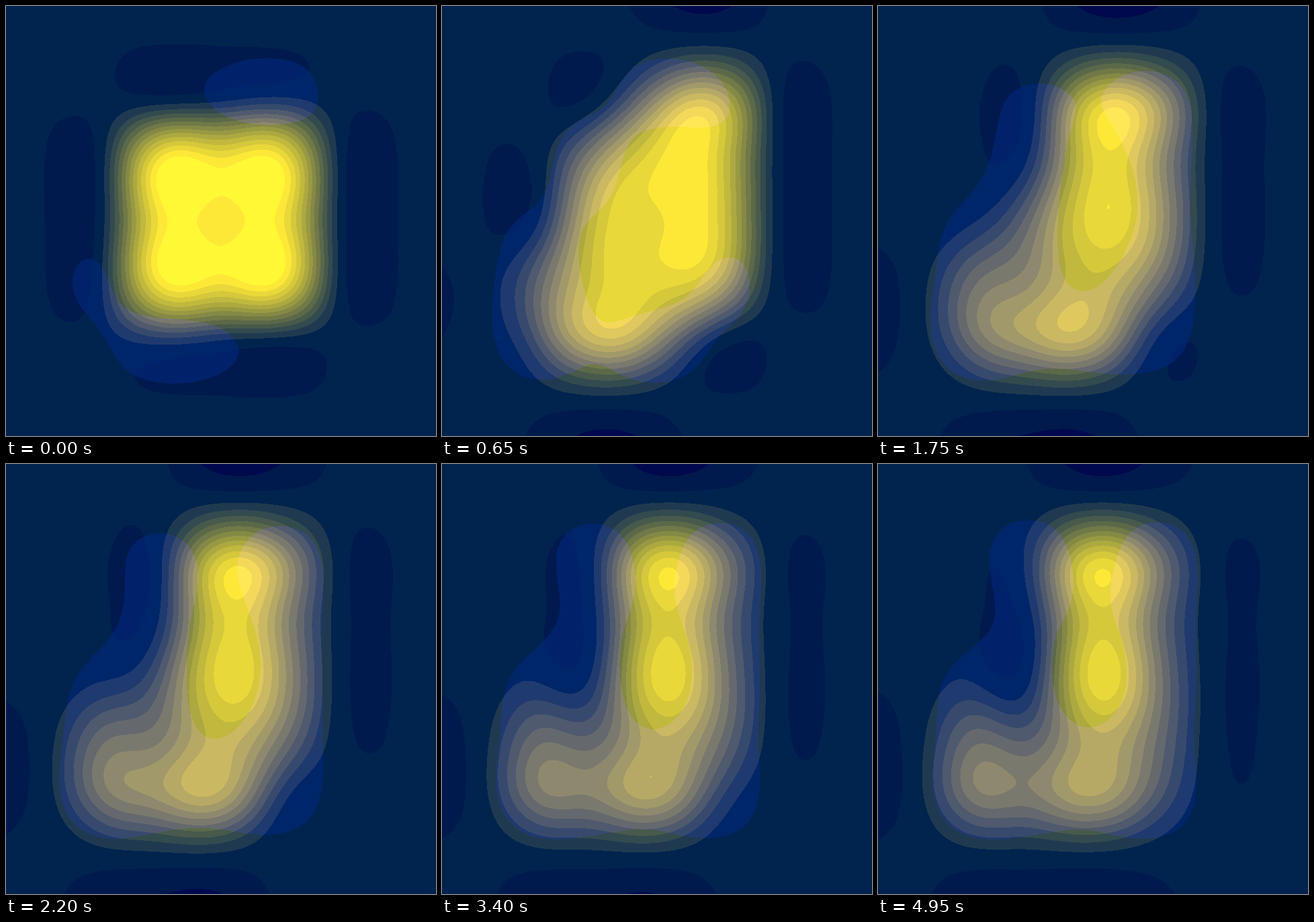
An HTML page with a canvas for the animation above (5000 ms loop, 640 by 640 pixels).

```html
<!DOCTYPE html>
<html lang="en">
<head>
<meta charset="utf-8">
<title>Heat map</title>
<style>
  html, body { margin: 0; width: 100%; height: 100%; overflow: hidden; background: #00244d; }
  canvas { display: block; width: 640px; height: 640px; }
</style>
</head>
<body>
<canvas id="stage" width="640" height="640"></canvas>
<script>
const SIZE = 640, CELLS = 7, LOOP = 5000, STEP = 50;

// Heat that the active cells (rows 1-5, columns 1-4) settle to.
const settled = [
  [0, .15, .86, .46],
  [0, .07, .85, .44],
  [.07, .08, .94, .5],
  [.37, .33, .7, .42],
  [.4, .44, .61, .28]
];

const clamp = (v, lo, hi) => Math.min(hi, Math.max(lo, v));

const sinc = x => x ? Math.sin(Math.PI * x) / (Math.PI * x) : 1;
const lanczos = x => Math.abs(x) < 3 ? sinc(x) * sinc(x / 3) : 0;

// Normalised filter weights for every pixel along one axis.
const weights = Array.from({ length: SIZE }, (_, p) => {
  const pos = (p + .5) * CELLS / SIZE - .5;
  const w = Array.from({ length: CELLS }, (_, c) => lanczos(pos - c));
  const sum = w.reduce((a, b) => a + b);
  return w.map(v => v / sum);
});

// A hot 3x3 block cools while heat spreads out of it towards two corners.
function heatAt(t, row, col) {
  if (row < 1 || row > 5 || col < 1 || col > 4) return 0;
  const end = settled[row - 1][col - 1];
  const offset = Math.abs(row - col);
  const inBlock = row > 1 && row < 5 && col > 1;
  if (!inBlock && offset < 2) return end * (t / LOOP) ** 1.3;

  const peak = col > 1 ? 1 : end;
  const cooling = offset ? 1700 : 850;
  const level = end + (peak - end) * Math.exp(-((t / cooling) ** 1.5));
  if (inBlock) return level;
  const filling = 380 * 2.3 ** Math.abs(3 - offset);
  return level * (1 - Math.exp(-(t + 35) / filling));
}

const greenOf = v => 34 + 198 * v;
const blueOf = v => 78 + 40 * (1 - Math.exp(-18 * v)) - 62 * v ** 3.5;

// Flat colour bands, each with a plain and a bluer shade.
const pack = (r, g, b) => (255 << 24 | Math.round(b) << 16 | Math.round(g) << 8 | Math.round(r)) >>> 0;
const bands = [[9, 22], [26, 34], [36, 38]].map(([g, blueG]) => [pack(0, g, 78), pack(0, blueG, 106)]);
for (let k = 0; k < 13; k++) {
  const g = 58 + 15.8 * k, r = (g - 34) * 1.28;
  bands.push([
    pack(Math.min(255, r), g, 80 - 2.3 * k),
    pack(Math.min(255, r + Math.min(10, 4 * k)), g, 110 - 4 * Math.max(0, k - 5))
  ]);
}
const bandOf = g => g < 8 ? 0 : g < 29 ? 1 : g < 50 ? 2 : 3 + Math.min(12, Math.floor((g - 50) / 16.25));
const bandTable = Array.from({ length: 256 }, (_, g) => bands[bandOf(g)]);

const ctx = document.getElementById("stage").getContext("2d");
const image = ctx.createImageData(SIZE, SIZE);
const pixels = new Uint32Array(image.data.buffer);
const makeLines = () => Array.from({ length: CELLS }, () => new Float32Array(SIZE));
const green = makeLines(), blue = makeLines();

function draw(t) {
  for (let row = 0; row < CELLS; row++) {
    const cells = Array.from({ length: CELLS }, (_, col) => heatAt(t, row, col));
    const greens = cells.map(greenOf), blues = cells.map(blueOf);
    for (let x = 0; x < SIZE; x++) {
      let g = 0, b = 0;
      for (let c = 0; c < CELLS; c++) {
        g += weights[x][c] * greens[c];
        b += weights[x][c] * blues[c];
      }
      green[row][x] = clamp(g, 0, 255);
      blue[row][x] = clamp(b, 0, 255);
    }
  }
  for (let y = 0, p = 0; y < SIZE; y++) {
    const w = weights[y];
    for (let x = 0; x < SIZE; x++, p++) {
      let g = 0, b = 0;
      for (let c = 0; c < CELLS; c++) {
        g += w[c] * green[c][x];
        b += w[c] * blue[c][x];
      }
      pixels[p] = bandTable[Math.round(clamp(g, 0, 255))][b > 92 ? 1 : 0];
    }
  }
  ctx.putImageData(image, 0, 0);
}

const start = performance.now();
let shown = -1;
function tick() {
  const t = Math.max(0, performance.now() - start) % LOOP;
  const step = Math.floor(t / STEP);
  if (step !== shown) draw((shown = step) * STEP);
  requestAnimationFrame(tick);
}
tick();
</script>
</body>
</html>
```
